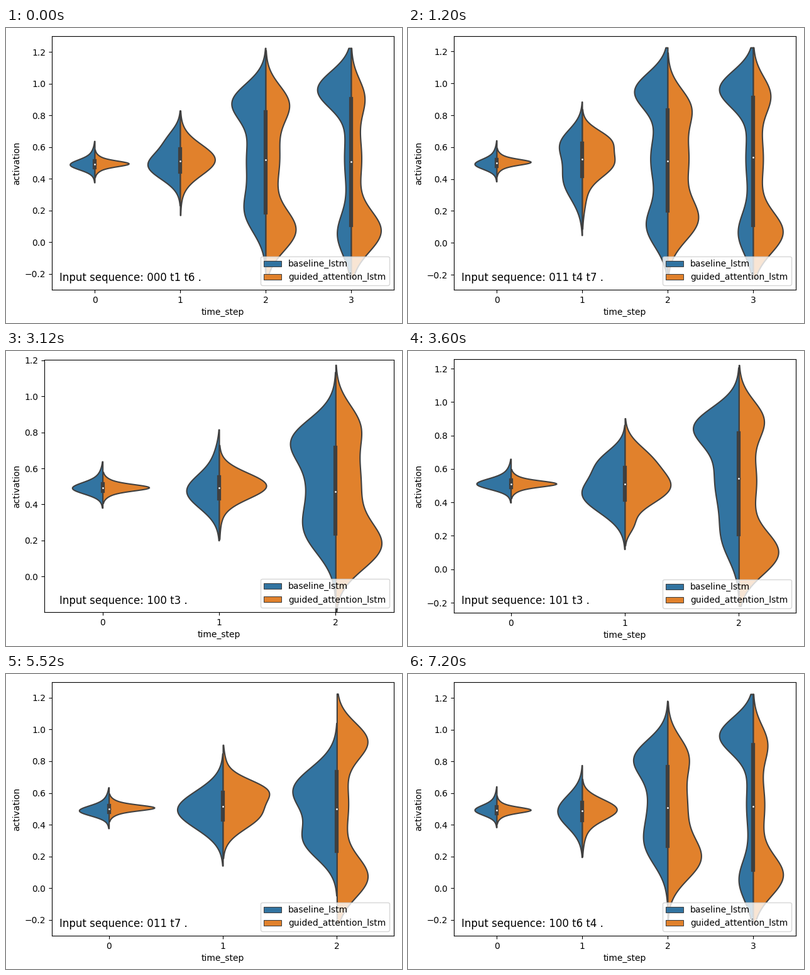
These frames come from a looping animation (630 px wide and 470 px high, 8000 ms). A matplotlib script:

```python
import matplotlib.pyplot as plt
import numpy as np
from matplotlib.animation import FuncAnimation
from matplotlib.patches import Patch
from matplotlib.ticker import MultipleLocator

W, H, DPI = 630, 470, 100
BLUE, ORANGE, GRAY = "#3274a1", "#e1812c", "#3f3f3f"
LINE = 1.5
HALF = 0.4                      # widest half violin, in category units
STEP_MS, STEPS, STEPS_PER_SCENE = 400, 20, 3
GRID = np.linspace(-0.22, 1.225, 400)


def density(*bumps):
    """Sum of Gaussians given as (height, mean, spread)."""
    return sum(h * np.exp(-((GRID - m) / s) ** 2 / 2) for h, m, s in bumps)


def start(height, blue_mean, orange_mean):
    """First time step: both models still sit near 0.5."""
    blue = density((0.77 * height, blue_mean, 0.03),
                   (0.25 * height, blue_mean + 0.02, 0.055))
    orange = density((0.6, orange_mean, 0.016), (0.4, orange_mean, 0.033))
    return blue, orange


def twin(high, high_mean, middle, low, low_mean):
    """Late time step: activations split into a high and a low group."""
    return density((high, high_mean, 0.115), (middle, 0.53, 0.2),
                   (low, low_mean, 0.13))


def scene_a():
    yield start(0.72, 0.489, 0.4965)
    yield (density((0.93, 0.485, 0.085), (0.3, 0.65, 0.07)),
           density((0.96, 0.522, 0.095), (0.06, 0.48, 0.16)))
    yield twin(0.88, 0.89, 0.55, 0.5, 0.18), twin(0.6, 0.88, 0.4, 0.85, 0.075)
    yield twin(0.97, 0.965, 0.2, 0.4, 0.05), twin(0.35, 0.92, 0.3, 0.85, 0.07)


def scene_b():
    yield start(0.64, 0.493, 0.507)
    yield (density((0.55, 0.63, 0.09), (0.55, 0.4, 0.125)),
           density((0.65, 0.65, 0.065), (0.88, 0.5, 0.085), (0.1, 0.3, 0.1)))
    yield twin(0.92, 0.955, 0.5, 0.58, 0.1), twin(0.53, 0.86, 0.6, 0.8, 0.14)
    yield twin(0.97, 0.965, 0.22, 0.43, 0.06), twin(0.47, 0.93, 0.29, 0.85, 0.065)


def scene_c():
    yield start(0.65, 0.49, 0.494)
    yield (density((0.7, 0.475, 0.095), (0.06, 0.68, 0.07)),
           density((0.94, 0.505, 0.07), (0.08, 0.45, 0.12)))
    yield twin(0.68, 0.77, 0.55, 0.48, 0.24), twin(0.38, 0.85, 0.52, 0.88, 0.165)


def scene_d():
    yield start(0.75, 0.51, 0.512)
    yield (density((0.93, 0.45, 0.11), (0.42, 0.65, 0.078)),
           density((0.95, 0.49, 0.1), (0.42, 0.67, 0.085), (0.13, 0.26, 0.05)))
    yield twin(0.86, 0.86, 0.52, 0.28, 0.17), twin(0.48, 0.9, 0.38, 0.83, 0.095)


def scene_e():
    yield start(0.65, 0.488, 0.5075)
    yield (density((1, 0.495, 0.117)),
           density((0.75, 0.625, 0.068), (0.8, 0.47, 0.095), (0.05, 0.78, 0.07)))
    yield (density((0.95, 0.62, 0.14), (0.68, 0.3, 0.12)),
           twin(0.64, 0.93, 0.25, 0.66, 0.07))


def scene_f():
    yield start(0.66, 0.4885, 0.5005)
    yield (density((0.95, 0.47, 0.1), (0.2, 0.62, 0.08)),
           density((0.55, 0.67, 0.075), (0.72, 0.53, 0.085), (0.04, 0.85, 0.07)))
    yield (density((0.72, 0.66, 0.16), (0.95, 0.295, 0.14)),
           twin(0.75, 0.94, 0.22, 0.69, 0.065))


def scene_g():
    yield start(0.64, 0.4925, 0.4945)
    yield (density((0.72, 0.487, 0.1)),
           density((0.95, 0.5, 0.063), (0.12, 0.4, 0.09)))
    yield twin(0.82, 0.83, 0.52, 0.46, 0.26), twin(0.45, 0.85, 0.55, 0.85, 0.18)
    yield twin(0.97, 0.965, 0.2, 0.41, 0.05), twin(0.37, 0.92, 0.33, 0.85, 0.08)


# Axes frame in pixels: left, top, right, bottom.
WIDE = (61, 14, 617, 416)
USUAL = (73, 13, 617, 417)
SCENES = [
    ("000 t1 t6", scene_a, (-0.299, 1.300), USUAL),
    ("011 t4 t7", scene_b, (-0.294, 1.296), USUAL),
    ("100 t3", scene_c, (-0.198, 1.203), WIDE),
    ("101 t3", scene_d, (-0.260, 1.257), USUAL),
    ("011 t7", scene_e, (-0.299, 1.298), USUAL),
    ("010 t8", scene_f, (-0.306, 1.307), USUAL),
    ("100 t6 t4", scene_g, (-0.299, 1.300), USUAL),
]

plt.rcParams["font.family"] = "DejaVu Sans"
fig = plt.figure(figsize=(W / DPI, H / DPI), dpi=DPI, facecolor="white")
ax = fig.add_axes([0.1, 0.1, 0.8, 0.8])
handles = [Patch(facecolor=c, edgecolor=GRAY, linewidth=LINE / 2, label=name)
           for c, name in ((BLUE, "baseline_lstm"),
                           (ORANGE, "guided_attention_lstm"))]


def draw_violin(x, blue, orange):
    for side, curve, color in ((-1, blue, BLUE), (1, orange, ORANGE)):
        seen = curve > 0.01
        ax.fill_betweenx(GRID[seen], x, x + side * HALF * curve[seen],
                         facecolor=color, edgecolor=GRAY, linewidth=LINE)
    # Quartiles of both models pooled with equal weight.
    pooled = np.cumsum(blue / blue.sum() + orange / orange.sum()) / 2
    low, median, high = np.interp([0.25, 0.5, 0.75], pooled, GRID)
    ax.plot([x, x], [low, high], color=GRAY, linewidth=3 * LINE)
    ax.scatter(x, median, s=(2 * LINE) ** 2, color="white", edgecolor=GRAY,
               linewidth=1, zorder=3)


def draw(step):
    text, violins, limits, frame = SCENES[step // STEPS_PER_SCENE]
    left, top, right, bottom = frame
    ax.clear()
    ax.set_position([left / W, 1 - bottom / H,
                     (right - left) / W, (bottom - top) / H])
    pairs = list(violins())
    for x, (blue, orange) in enumerate(pairs):
        draw_violin(x, blue, orange)

    ax.set_xticks(range(len(pairs)))
    ax.yaxis.set_major_locator(MultipleLocator(0.2))
    ax.set_xlim(-0.5, len(pairs) - 0.5)
    ax.set_ylim(*limits)
    ax.set_xlabel("time_step")
    ax.set_ylabel("activation")
    ax.text(85 / W, 1 - 403 / H, f"Input sequence: {text} .", fontsize=12,
            transform=fig.transFigure)
    ax.legend(handles=handles, loc="lower right")
    return ()


anim = FuncAnimation(fig, draw, frames=STEPS, interval=STEP_MS, repeat=True)
plt.show()
```
